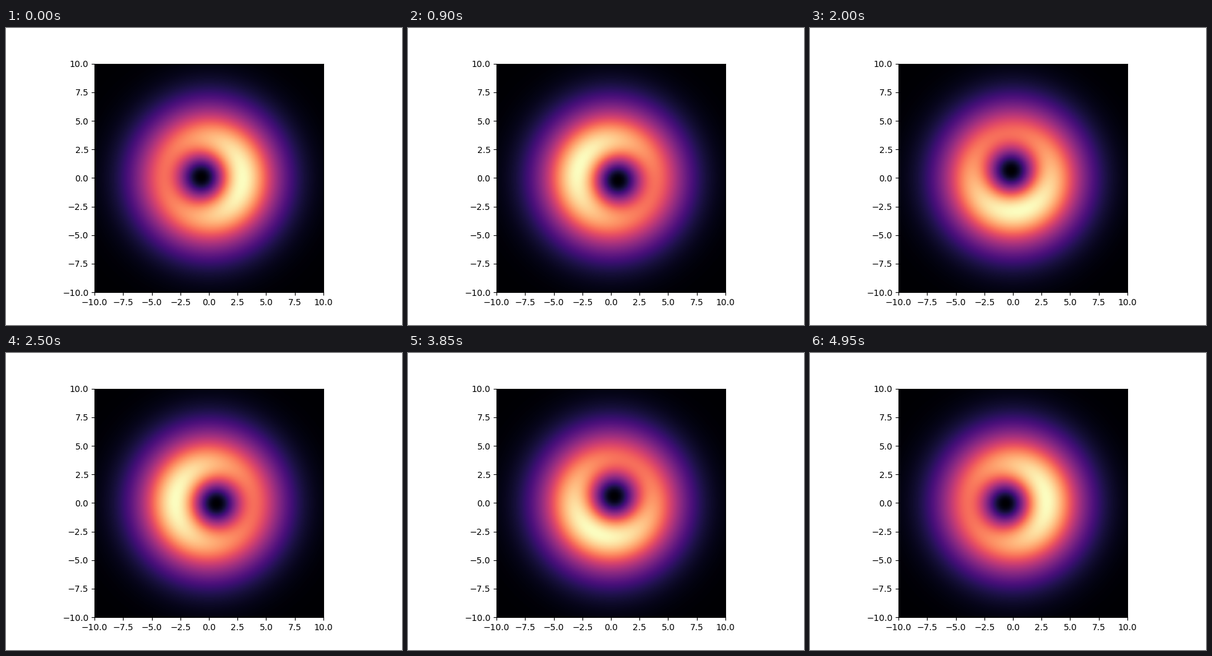
Recreate the animation shown at these times as a matplotlib script. Size 640 by 480 pixels, loop 5000 ms.

```python
import numpy as np
import matplotlib.pyplot as plt
from matplotlib.animation import FuncAnimation

FRAMES = 100
TURNS = 3
HALF = 10.0        # half width of the plotted square
CLOUD = 25.0       # squared width of the resting cloud
HOLE = 8.6         # squared width of the moving hole
ORBIT = 0.66       # radius of the hole's path

axis = np.linspace(-HALF, HALF, 300)
X, Y = np.meshgrid(axis, axis)
cloud = np.exp(-(X**2 + Y**2) / CLOUD)


def density(frame):
    """Gaussian cloud with a hole circling clockwise near its centre."""
    angle = np.pi - 2 * np.pi * TURNS * (frame + 0.5) / FRAMES
    dx = X - ORBIT * np.cos(angle)
    dy = Y - ORBIT * np.sin(angle)
    return cloud * (1 - np.exp(-(dx**2 + dy**2) / HOLE))


fig, ax = plt.subplots(figsize=(6.4, 4.8), dpi=100)
start = density(0)
image = ax.imshow(start, cmap="magma", origin="lower", vmin=0, vmax=start.max(),
                  extent=(-HALF, HALF, -HALF, HALF))


def update(frame):
    image.set_data(density(frame))
    return (image,)


anim = FuncAnimation(fig, update, frames=FRAMES, interval=50,
                     repeat=True, repeat_delay=0)
plt.show()
```
